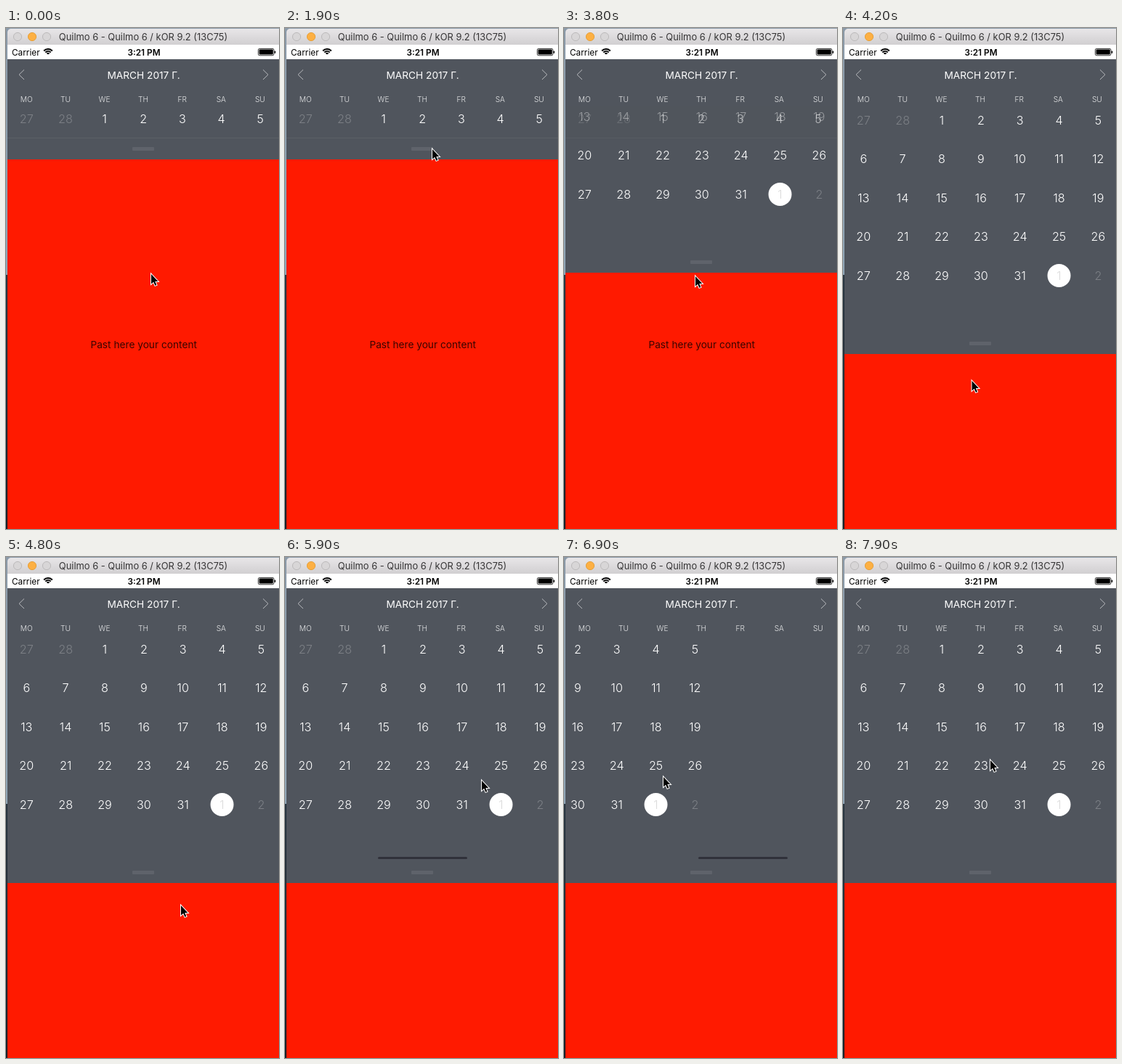
An HTML page with a canvas for the animation above (8 s loop, 376x690 px).

```html
<!DOCTYPE html>
<html>
<head>
<meta charset="utf-8">
<style>
html, body { margin: 0; width: 376px; height: 690px; overflow: hidden; }
canvas { display: block; }
</style>
</head>
<body>
<canvas id="stage" width="376" height="690"></canvas>
<script>
const c = document.getElementById('stage').getContext('2d');
const LOOP = 8000, STEP = 100, DRAG = 2700;
const PANEL = '#50555d', CLOSED = 181, OPEN = 449, ROW = 53.5;
const DIM = 'rgba(255,255,255,.25)';
const DAYS = ['MO', 'TU', 'WE', 'TH', 'FR', 'SA', 'SU'];

// Turning points of the pointer: [time, x, y]
const path = [
  [0, 199, 338], [700, 202, 157], [1800, 202, 157], [1900, 202, 166],
  [2300, 204, 205], [DRAG, 204, 205], [3800, 180, 341], [4500, 174, 593],
  [4700, 174, 593], [4800, 240, 479], [5500, 285, 308], [5900, 270, 307],
  [6900, 136, 302], [7400, 80, 331], [7700, 80, 331], [7900, 202, 279]
];

const clamp = (v, lo = 0, hi = 1) => Math.min(hi, Math.max(lo, v));
const smooth = (t, from, to) => {
  const u = clamp((t - from) / (to - from));
  return u * u * (3 - 2 * u);
};

function pointer(t) {
  const i = path.findIndex(k => k[0] > t);
  if (i < 0) return path[path.length - 1].slice(1);
  const a = path[i - 1], b = path[i], u = (t - a[0]) / (b[0] - a[0]);
  return [1, 2].map(n => a[n] + (b[n] - a[n]) * u);
}

function rect(x, y, w, h, fill, r = 0) {
  c.fillStyle = fill;
  c.beginPath();
  c.roundRect(x, y, w, h, r);
  c.fill();
}

function disc(x, y, r, fill, stroke) {
  c.beginPath();
  c.arc(x, y, r, 0, 7);
  c.fillStyle = fill;
  c.fill();
  if (stroke) { c.strokeStyle = stroke; c.lineWidth = 1; c.stroke(); }
}

function text(s, x, y, size, color, weight = 400, align = 'center') {
  c.font = `${weight} ${size}px Inter, Roboto, sans-serif`;
  c.textAlign = align;
  c.fillStyle = color;
  c.fillText(s, x, y);
}

function fade(y0, y1, from, to) {
  const g = c.createLinearGradient(0, y0, 0, y1);
  g.addColorStop(0, from);
  g.addColorStop(1, to);
  return g;
}

function titleBar() {
  rect(0, 0, 376, 340, fade(0, 340, '#8b9aa8', '#8fa5b5'));
  rect(0, 340, 376, 350, fade(340, 690, '#26343f', '#191d24'));
  rect(2, 1, 380, 30, fade(1, 23, '#e8e6e8', '#d1cfd1'), 5);
  for (let i = 0; i < 3; i++) {
    const on = i === 1;
    disc(16 + i * 20, 12, 5.6, on ? '#fdb043' : '#d8d6d7', on ? '#e6a03a' : '#bcbabb');
  }
  text('Quilmo 6 - Quilmo 6 / kOR 9.2 (13C75)', 189, 17, 12.9, '#363536');
}

function statusBar() {
  rect(2, 23, 374, 20, '#fff');
  text('Carrier', 8, 37.5, 11.8, '#000', 400, 'left');
  text('3:21 PM', 190, 37.5, 11.8, '#000', 600);
  c.strokeStyle = '#000';
  c.lineWidth = 2;
  for (let r = 2; r < 9; r += 3) {
    c.beginPath();
    c.arc(58, 37, r, -Math.PI * .76, -Math.PI * .24);
    c.stroke();
  }
  c.lineWidth = .8;
  c.beginPath();
  c.roundRect(347.4, 28.4, 21.6, 9.4, 2);
  c.stroke();
  rect(348.6, 29.6, 19.2, 7, '#000', 1);
  rect(369.7, 31.5, 1.5, 3.5, '#000', 1);
}

function chevron(x, dir) {
  c.beginPath();
  c.moveTo(x, 57.5);
  c.lineTo(x + 7 * dir, 64.3);
  c.lineTo(x, 71);
  c.strokeStyle = '#b9bbbe';
  c.lineWidth = 1;
  c.stroke();
}

function header() {
  rect(2, 43, 374, 64, PANEL);
  chevron(25, -1);
  chevron(354, 1);
  text('MARCH 2017 Г.', 189.5, 70, 13.7, '#fff');
  DAYS.forEach((d, i) => text(d, 28.3 + i * 53.6, 102, 10.2, '#e6e7e8', 300));
}

function week(row, y, pitch, shift = 0) {
  for (let i = 0; i < 7; i++) {
    const n = row * 7 + i - 1, x = 28.3 + i * pitch - shift;
    const day = n < 1 ? n + 28 : n > 31 ? n - 31 : n;
    const picked = n === 32;
    if (picked) disc(x, y, 16, '#fff');
    text(day, x, y + 5.8, 16.2, picked ? '#dcdcdc' : n < 1 || n > 31 ? DIM : '#fff', 300);
  }
}

function calendar(t, grip) {
  const bottom = t <= DRAG ? CLOSED : t > 4500 ? OPEN : clamp(grip - 4, CLOSED, OPEN);
  const p = (bottom - CLOSED) / (OPEN - CLOSED);
  const shift = 171 * (smooth(t, 5900, 6900) - smooth(t, 6900, 7400));
  rect(2, 43, 374, bottom - 43, PANEL);
  c.save();
  c.beginPath();
  c.rect(2, 107, 374, bottom - 107);
  c.clip();
  for (let r = 0; r < 5; r++) week(r, 127 + r * ROW + bottom - OPEN, 53.85, shift);

  // Single-week strip that dissolves as the month opens
  c.globalAlpha = 1 - p ** 1.7;
  if (p < 1) {
    rect(2, 107, 374, 45, PANEL);
    week(0, 125.5, 53.65);
    rect(2, 151, 374, 1, '#5b6067');
  }
  c.globalAlpha = smooth(t, 5600, 5800) - smooth(t, 7100, 7400);
  rect(128 + shift / 3, 413, 123, 3, 'rgba(12,8,18,.46)', 1.5);
  c.restore();
  rect(174, bottom - 17, 30, 5, '#5f636b', 1);
  header();
}

function cursor(x, y) {
  c.save();
  c.translate(x + 1, y + 1);
  c.beginPath();
  c.moveTo(0, 0);
  c.lineTo(0, 13.6);
  c.lineTo(3.2, 10.8);
  c.lineTo(5.4, 15.8);
  c.lineTo(7.4, 15);
  c.lineTo(5.3, 10);
  c.lineTo(9.4, 10);
  c.closePath();
  c.strokeStyle = '#fff';
  c.lineWidth = 2;
  c.stroke();
  c.fillStyle = '#000';
  c.fill();
  c.restore();
}

function draw(now) {
  const t = Math.floor(now % LOOP / STEP) * STEP;
  const [x, y] = pointer(t);
  titleBar();
  statusBar();
  rect(2, 43, 374, 647, '#ff1a00');
  text('Past here your content', 189.7, 440.5, 13.7, '#3a0500');
  calendar(t, y);
  cursor(x, y);
  requestAnimationFrame(() => draw(performance.now()));
}
draw(0);
</script>
</body>
</html>
```
